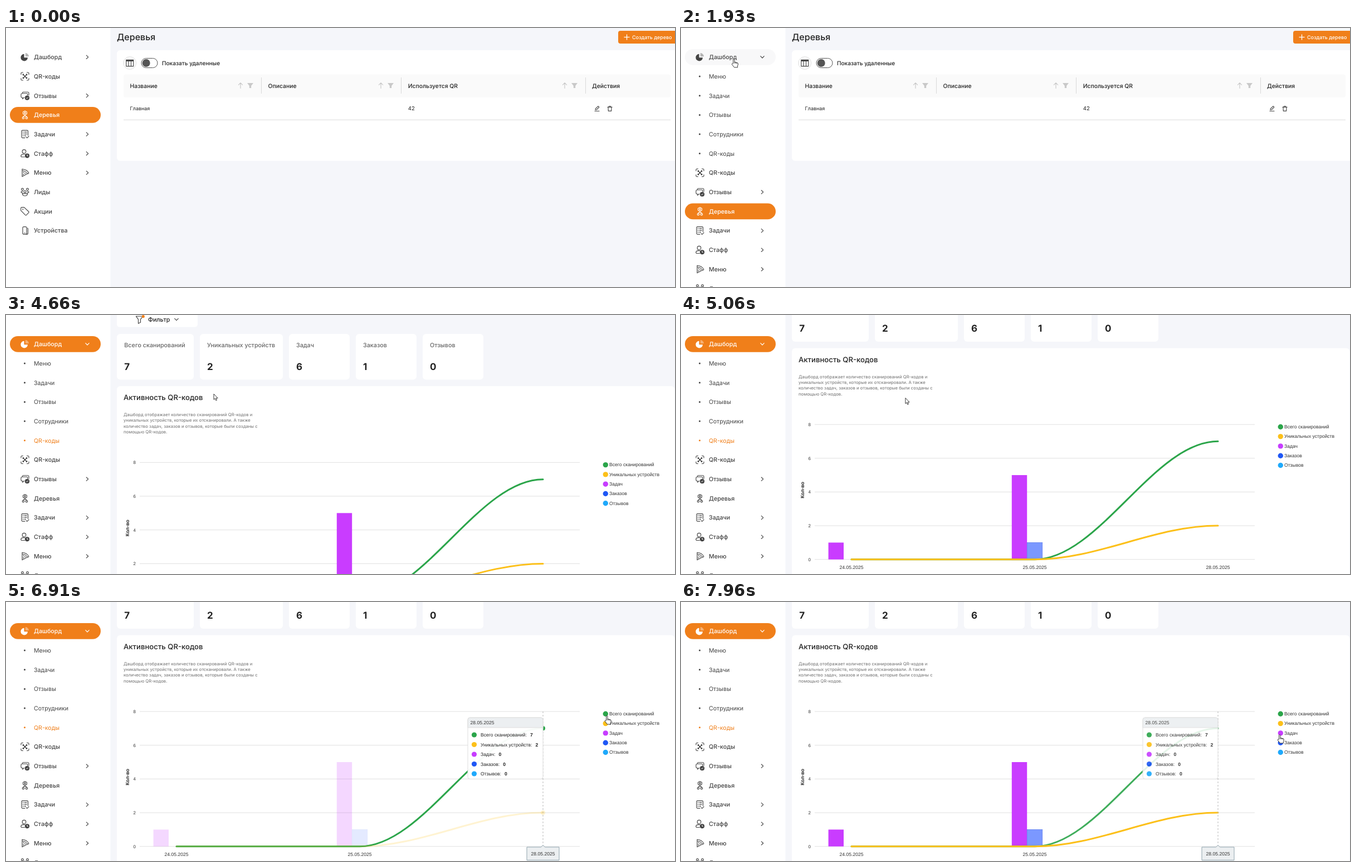
These frames come from a looping animation (1201 px wide and 466 px high, 7990 ms). An HTML page:

```html
<!DOCTYPE html>
<html lang="ru">
<head>
<meta charset="utf-8">
<style>
html, body { margin: 0; width: 100%; height: 100%; overflow: hidden; background: #f5f6fa; }
svg { display: block; width: 1201px; height: 466px; font-family: Inter, sans-serif; text-rendering: geometricPrecision; }
.ar { font-family: "Liberation Sans", Arial, sans-serif; }
.ic { fill: none; stroke: currentColor; stroke-width: 1.15; stroke-linecap: round; stroke-linejoin: round; }
.solid { fill: currentColor; stroke: none; }
</style>
</head>
<body>
<svg id="stage" viewBox="0 0 1201 466"></svg>
<script>
const LOOP = 7990, ROW = 34.7, TOP = 52.3;
const ORANGE = '#f07f1a', DARK = '#444';
const SERIES = [
  ['Всего сканирований', '#2ba54a', 7],
  ['Уникальных устройств', '#fcc01a', 2],
  ['Задач', '#c73dff', 0],
  ['Заказов', '#1f57f5', 0],
  ['Отзывов', '#1fa9fb', 0]
];

// Markup helpers
const text = (x, cy, size, str, fill = '#222', weight = 400, extra = '') =>
  `<text x="${x}" y="${cy + size * .36}" font-size="${size}" font-weight="${weight}" fill="${fill}" ${extra}>${str}</text>`;
const rect = (x, y, w, h, fill, rx = 0, extra = '') =>
  `<rect x="${x}" y="${y}" width="${w}" height="${h}" rx="${rx}" fill="${fill}" ${extra}/>`;
const dot = (x, y, r, fill, extra = '') => `<circle cx="${x}" cy="${y}" r="${r}" fill="${fill}" ${extra}/>`;
const line = (x1, y1, x2, y2, stroke, extra = '') =>
  `<path d="M${x1} ${y1}L${x2} ${y2}" stroke="${stroke}" fill="none" ${extra}/>`;
const at = (x, y, body, extra = '') => `<g transform="translate(${x} ${y})" ${extra}>${body}</g>`;
const path = (d, cls = 'ic') => `<path class="${cls}" d="${d}"/>`;
const ring = (x, y, r) => `<circle class="ic" cx="${x}" cy="${y}" r="${r}"/>`;
const badge = d => dot(4, 4, 4.1, 'currentColor') + `<path d="${d}" stroke="#fff" fill="none"/>`;

const ICONS = {
  pie: path('M-1.5 -5.5A6.3 6.3 0 1 0 5 1H-1.5z', 'solid') + '<path d="M.8 -7.2A6.2 6.2 0 0 1 7 -1H.8z" fill="currentColor" opacity=".38"/>',
  qr: path('M-7 -3.5V-5.5Q-7 -7 -5.5 -7H-3.5M3.5 -7H5.5Q7 -7 7 -5.5V-3.5M7 3.5V5.5Q7 7 5.5 7H3.5M-3.5 7H-5.5Q-7 7 -7 5.5V3.5M-2.8 -2.8L2.8 2.8M2.8 -2.8L-2.8 2.8') +
    [[-3, -3], [3, -3], [-3, 3], [3, 3], [0, 0]].map(p => dot(...p, 1.4, 'currentColor')).join(''),
  chat: path('M-4.5 -4.2V-5Q-4.5 -6.5 -3 -6.5H5Q7 -6.5 7 -4.5V-1M-1 3.5H-2L-4.2 6V3.5H-5Q-7 3.5 -7 1.8V-2.3Q-7 -4 -5 -4H3Q4.8 -4 4.8 -2V-.8') + badge('M2.2 4L3.5 5.3L6 2.8'),
  tree: path('M0 -7.2L3.4 -5.4V-1.8L0 0L-3.4 -1.8V-5.4zM0 0V2M-3 3.5Q-3 2 -1.5 2H1.5Q3 2 3 3.5M-1.2 -2.8Q0 -1.9 1.2 -2.8') +
    ring(0, -4.3, .7) + ring(-3, 5.4, 1.7) + ring(3, 5.4, 1.7),
  tasks: path('M5.5 2V-5.5Q5.5 -7 4 -7H-4.5Q-6 -7 -6 -5.5V5Q-6 6.5 -4.5 6.5H0M-3.8 -3.8H-3M-1 -3.8H3.2M-3.8 -.5H-3M-1 -.5H3.2M-3.8 2.8H-3M-1 2.8H1.5M2 5L3.8 6.8L7 3.5'),
  staff: ring(-1.5, -3.6, 3.3) + path('M-.5 6.2H-5Q-7.2 6.2 -7.2 4.4Q-6.8 1.4 -3 1.4H0') + badge('M4 1.8V4.2H5.8'),
  pizza: path('M-5 -6.8Q3.8 -5.8 6.8 .2Q6.6 2.2 4.6 1.6L-5 6.8zM-5 -4Q1.8 -3 4.6 1.6') +
    [[-2.5, -.8], [.2, 1], [-2.8, 3]].map(p => dot(...p, .9, 'currentColor')).join(''),
  leads: ring(-4.5, -5, 1.9) + ring(4.5, -5, 1.9) + ring(0, -.8, 1.9) +
    path('M-7 .4Q-6.8 -1.4 -4 -1.4M7 .4Q6.8 -1.4 4 -1.4M-4.6 2.6H4.6Q4.6 6.8 0 6.8Q-4.6 6.8 -4.6 2.6M-7 .4Q-6.6 1.4 -4.6 1.4M7 .4Q6.6 1.4 4.6 1.4'),
  tag: path('M-7.3 -5.5Q-7.3 -7.2 -5.6 -7.2H-1.4L6.8 .6Q7.6 1.4 6.8 2.3L2.4 6.8Q1.6 7.4 .8 6.7L-7.3 -1.5z') + dot(-3.7, -3.6, 1, 'currentColor'),
  phone: path('M-4 -5Q-4 -7 -2 -7H1Q3 -7 3 -5V4.5Q3 6.5 1 6.5H-2Q-4 6.5 -4 4.5zM4.6 -4.5Q5.4 -4 5.4 -3V4.5Q5.4 6.8 3 6.8M-1 4.2H0')
};
const chevron = id => `<path ${id ? `id="${id}"` : ''} class="ic" d="M-1.7 -3.2L1.7 0L-1.7 3.2" transform="translate(146 0)"/>`;

const item = (i, icon, label, more, id = '') => at(0, TOP + ROW * i,
  at(34, 0, ICONS[icon]) + text(50, 0, 10.7, label, 'currentColor', 500) + (more ? chevron(id && 'arrow') : ''),
  `color="${DARK}" ${id ? `id="${id}"` : ''}`);
const pill = (id, y, fill) => `<rect id="${id}" x="7" y="${y - 14.4}" width="163" height="28.8" rx="14.4" fill="${fill}"/>`;

const sidebar = rect(0, 0, 187.5, 466, '#fff') +
  pill('hover', TOP, '#f8f8f9') + pill('homePill', TOP, ORANGE) + item(0, 'pie', 'Дашборд', true, 'home') +
  `<clipPath id="subClip"><rect id="subBox" x="0" y="70" width="187" height="0"/></clipPath>
   <g clip-path="url(#subClip)"><g id="sub">` +
  ['Меню', 'Задачи', 'Отзывы', 'Сотрудники', 'QR-коды'].map((s, i) =>
    at(0, TOP + ROW * (i + 1), dot(33.5, 0, 1.5, 'currentColor') + text(50, 0, 10.6, s, 'currentColor'),
      `color="${DARK}" ${i == 4 ? 'id="subLast"' : ''}`)).join('') + '</g></g><g id="rest">' +
  pill('treePill', TOP + ROW * 3, ORANGE) +
  item(1, 'qr', 'QR-коды') + item(2, 'chat', 'Отзывы', true) + item(3, 'tree', 'Деревья', false, 'tree') +
  item(4, 'tasks', 'Задачи', true) + item(5, 'staff', 'Стафф', true) + item(6, 'pizza', 'Меню', true) +
  item(7, 'leads', 'Лиды') + item(8, 'tag', 'Акции') + item(9, 'phone', 'Устройства') + '</g>';

// Table page
const sorter = x => at(x, 103.5, path('M0 5V-4.5M-3.6 -1.2L0 -4.8L3.6 -1.2') +
  path('M12 -4.5H23L19.2 .6V4.5H15.8V.6z', 'solid'), 'color="#c9c9c9"');
const tablePage = '<g id="tablePage">' + text(199, 16, 16, 'Деревья', '#222', 500) +
  rect(1099, 5, 112, 23, ORANGE, 4) + line(1109.5, 16.5, 1119.5, 16.5, '#fff', 'stroke-width="1.3"') +
  line(1114.5, 11.5, 1114.5, 21.5, '#fff', 'stroke-width="1.3"') + text(1124, 16.8, 9, 'Создать дерево', '#fff', 500) +
  rect(199, 40, 1020, 199, '#fff', 6) +
  dot(222.3, 63, 11.3, '#fff', 'stroke="#ddd"') +
  at(222.3, 63, path('M-6.5 -5.8H6.5V5.8H-6.5zM-6.5 -3.8H6.5M-2.2 -3.8V5.8M2.2 -3.8V5.8') + path('M-6.5 -5.8H6.5V-3H-6.5z', 'solid'), `color="${DARK}"`) +
  rect(243, 54.5, 29, 17, '#fff', 8.5, 'stroke="#555"') + dot(251.7, 63, 7, '#555') +
  text(280, 63.5, 10.1, 'Показать удаленные', '#222', 500) +
  rect(211, 83.5, 982, 41.5, '#fafafa', 4) +
  [[222.5, 'Название'], [470.5, 'Описание'], [721.7, 'Используется QR'], [1052, 'Действия']]
    .map(([x, s]) => text(x, 104, 10.4, s, '#222', 500)).join('') +
  [421, 673, 1003].map(sorter).join('') +
  [458.5, 709.5, 1040.5].map(x => line(x, 89, x, 118, '#d9d9d9')).join('') +
  text(222.5, 145, 9, 'Главная') + text(721.7, 145, 9.6, '42') +
  line(211, 165.3, 1193, 165.3, '#dcdcdc') +
  at(1061, 145, path('M-3 2.3L-2.6 .2L2 -4.4L3.8 -2.6L-.8 2zM-4 4.5H4'), `color="${DARK}"`) +
  at(1084, 145, path('M-4 -2.6H4M-1.6 -2.8V-4.3H1.6V-2.8M-3 -2.4L-2.7 4.3H2.7L3 -2.4'), `color="${DARK}"`) + '</g>';

// Dashboard page, laid out in its scrolled position
const BASE = 439.8, UNIT = 30.35, X = [306, 635, 964];
const level = v => BASE - v * UNIT;
const curve = v => {
  const k = (X[2] - X[1]) * .35, y = level(v);
  return `M${X[0]} ${BASE}H${X[1]}C${X[1] + k} ${BASE} ${X[2] - k} ${y} ${X[2]} ${y}`;
};
const bar = (x, v, fill, extra) => rect(x, level(v), 27.4, v * UNIT, fill, 0, extra);
const card = ([x, w, tx, label, n]) => rect(x, -34.3, w, 82.3, '#fff', 6) +
  text(tx, -14, 10.75, label, '#666', 500) + text(tx, 24.3, 17, n, '#222', 700);

const tooltip = '<g id="tip">' +
  rect(829, 208, 135, 110.5, '#fff', 4, 'fill-opacity=".96" stroke="#ddd"') +
  '<path d="M829 226V212Q829 208 833 208H960Q964 208 964 212V226z" fill="#eceff1" stroke="#ddd"/>' +
  text(833.5, 217.2, 8.6, '28.05.2025', '#333') +
  SERIES.map(([s, c, v], i) => dot(840.5, 239 + i * 17.5, 4.6, c) +
    text(852, 239 + i * 17.5, 8.6, `${s}:<tspan dx="6" font-weight="700">${v}</tspan>`)).join('') + '</g>';

const dashPage = '<g id="dashPage">' +
  rect(199, -85, 145, 38.5, '#fff', 5) +
  at(239.5, -60.5, path('M-6 -5.5H6L2 0V5.5L-2 7.5V0z') + dot(6.8, -5.2, 2.6, ORANGE), `color="${DARK}"`) +
  text(255, -60.3, 10.7, 'Фильтр', '#222', 500) +
  at(306, -60.3, path('M-3.3 -1.7L0 1.7L3.3 -1.7'), `color="${DARK}"`) +
  [[199, 138, 212.3, 'Всего сканирований', 7], [348, 149, 361, 'Уникальных устройств', 2], [508, 109, 521, 'Задач', 6],
   [628, 109, 641, 'Заказов', 1], [748, 109, 761, 'Отзывов', 0]].map(card).join('') +
  rect(199, 59.7, 1001.5, 500, '#fff', 6) +
  text(211, 80, 13.15, 'Активность QR-кодов', '#222', 500) +
  ['Дашборд отображает количество сканирований QR-кодов и', 'уникальных устройств, которые их отсканировали. А также',
   'количество задач, заказов и отзывов, которые были созданы с', 'помощью QR-кодов.']
    .map((s, i) => text(211, 111 + i * 10.3, 7.75, s, '#707070')).join('') +
  '<g class="ar">' +
  [0, 2, 4, 6, 8].map(v => line(240, level(v), 1030, level(v), '#e0e0e0') +
    text(233, level(v), 8, v, '#333', 400, 'text-anchor="end"')).join('') +
  `<text transform="translate(221 315) rotate(-90)" font-size="8.8" font-weight="700" text-anchor="middle" fill="#222">Кол-во</text>` +
  X.map((x, i) => text(x, 454, 8.6, `${24 + i + (i > 1) * 2}.05.2025`, '#333', 400, 'text-anchor="middle"')).join('') +
  `<g id="plot"><g id="bars">${bar(264.6, 1, '#c93cff') + bar(593.8, 5, '#c93cff') + bar(621.3, 1, '#7b98ff', 'stroke="#5f7ff0" stroke-width=".8"')}</g>` +
  [['green', 0], ['yellow', 1]].map(([id, i]) =>
    `<path id="${id}" d="${curve(SERIES[i][2])}" fill="none" stroke="${SERIES[i][1]}" stroke-width="3" stroke-linecap="round"/>`).join('') + '</g>' +
  '<g id="cross">' + line(X[2], 197, X[2], BASE, '#b6b6b6', 'stroke-dasharray="3"') +
  '<path d="M935 441H960.5L964 437.5L967.5 441H993V464.5H935z" fill="#eceff1" stroke="#90a4ae" stroke-linejoin="round"/>' +
  text(X[2], 452.7, 8.6, '28.05.2025', '#333', 400, 'text-anchor="middle"') + '</g>' +
  dot(X[2], level(7), 4, SERIES[0][1], 'id="dotG"') + dot(X[2], level(2), 4, SERIES[1][1], 'id="dotY"') +
  SERIES.map(([s, c], i) => dot(1076.3, 201.3 + i * 17.3, 4.7, c) + text(1083, 201 + i * 17.3, 8.6, s, '#333')).join('') +
  tooltip + '</g></g>';

const pointer = '<circle id="click" r="10" fill="#fcf34a" opacity=".8"/><g id="cursor" fill="#fff" stroke="#222" stroke-width=".9" stroke-linejoin="round">' +
  '<path id="arrowCur" d="M0 0V10.2L2.3 8.2L3.9 11.8L5.6 11L4 7.6H7.2z"/>' +
  '<path id="handCur" d="M-1.4 8V.8a1.2 1.2 0 0 1 2.4 0V5.5L6 6.8q1.5.4 1.3 2.2L6.4 12.5V15H.4L-3.6 9.8q-.7-1.4.6-1.8zM1 5.5V8M3.2 6V8M5.2 6.6V8.2"/></g>';

const $ = id => document.getElementById(id);
$('stage').innerHTML = rect(0, 0, 1201, 466, '#f5f6fa') + tablePage + dashPage + sidebar + pointer;

// Timing helpers
const clamp = v => Math.max(0, Math.min(1, v));
const span = (t, a, b) => clamp((t - a) / (b - a));
const smooth = p => p * p * (3 - 2 * p);
const cubic = p => p < .5 ? 4 * p ** 3 : 1 - 4 * (1 - p) ** 3;
const keys = (t, list, col = 1, ease = p => p) => {
  const i = list.findIndex(k => k[0] > t);
  if (i < 0) return list[list.length - 1][col];
  if (!i) return list[0][col];
  const a = list[i - 1], b = list[i];
  return a[col] + (b[col] - a[col]) * ease(span(t, a[0], b[0]));
};

const MOVES = [[110, 914, 417], [900, 94.5, 53.5], [1870, 94.5, 53.5], [2650, 134, 189], [2970, 121, 225], [3650, 121, 225],
  [4390, 373, 142], [4960, 373, 142], [5250, 480, 168], [5880, 1072, 201], [6040, 1079, 205], [6910, 1079, 205],
  [7200, 1079, 215], [7700, 1079, 216], [7960, 1075, 239]];

const set = (id, name, v) => $(id).setAttribute(name, v);
const show = (id, on) => set(id, 'display', on ? 'inline' : 'none');

function draw(t) {
  const x = keys(t, MOVES, 1, smooth), y = keys(t, MOVES, 2, smooth);
  const loaded = t >= 3620;

  // Sidebar
  const open = cubic(span(t, 1333, 1633)), drop = open * ROW * 5;
  set('subBox', 'height', drop);
  set('sub', 'opacity', open);
  set('rest', 'transform', `translate(0 ${drop})`);
  set('arrow', 'transform', `translate(146 0) rotate(${90 * open})`);
  show('homePill', loaded);
  show('treePill', !loaded);
  set('home', 'color', loaded ? '#fff' : DARK);
  set('tree', 'color', loaded ? DARK : '#fff');
  set('subLast', 'color', loaded ? ORANGE : DARK);
  const row = Math.round((y - TOP) / ROW);
  show('hover', t >= 110 && x > 7 && x < 170 && row >= 0 && row < 10);
  set('hover', 'y', TOP + row * ROW - 14.4);

  // Pages
  show('tablePage', !loaded);
  show('dashPage', loaded);
  set('dashPage', 'transform', `translate(0 ${71.6 * (1 - cubic(span(t, 4600, 4870)))})`);
  const grow = 1 - (1 - span(t, 3750, 4390)) ** 3;
  set('plot', 'transform', `translate(0 ${BASE * (1 - grow)}) scale(1 ${grow})`);

  // Series highlight
  const yellow = keys(t, [[5830, 1], [5990, .2], [6950, .2], [7100, 1]]);
  set('green', 'opacity', keys(t, [[7020, 1], [7170, .2], [7800, .2], [7960, .9]]));
  set('yellow', 'opacity', yellow);
  set('bars', 'opacity', keys(t, [[5830, 1], [5990, .2], [6930, .2], [7030, .8], [7150, .2], [7780, .2], [7940, 1]]));
  show('cross', t >= 5780);
  show('dotG', t >= 5780 && t < 7020);
  show('dotY', t >= 5780 && t < 7700);
  set('dotY', 'opacity', yellow);
  set('tip', 'opacity', keys(t, [[5820, 0], [5880, .4], [5990, 1], [7880, 1], [7960, .9]]));
  set('tip', 'transform', `translate(${keys(t, [[5820, -72], [5880, -43], [6010, 0]])} ${keys(t, [[5880, -1.5], [6010, 0]])})`);

  // Pointer
  const hand = t >= 930 && (x < 170 || x > 1068);
  show('cursor', t >= 110);
  show('handCur', hand);
  show('arrowCur', !hand);
  set('cursor', 'transform', `translate(${x} ${y})`);
  show('click', (t >= 1210 && t < 1290) || (t >= 3380 && t < 3450));
  set('click', 'transform', `translate(${x} ${y})`);
}

const start = performance.now();
function tick() {
  draw((performance.now() - start) % LOOP);
  requestAnimationFrame(tick);
}
tick();
</script>
</body>
</html>
```
